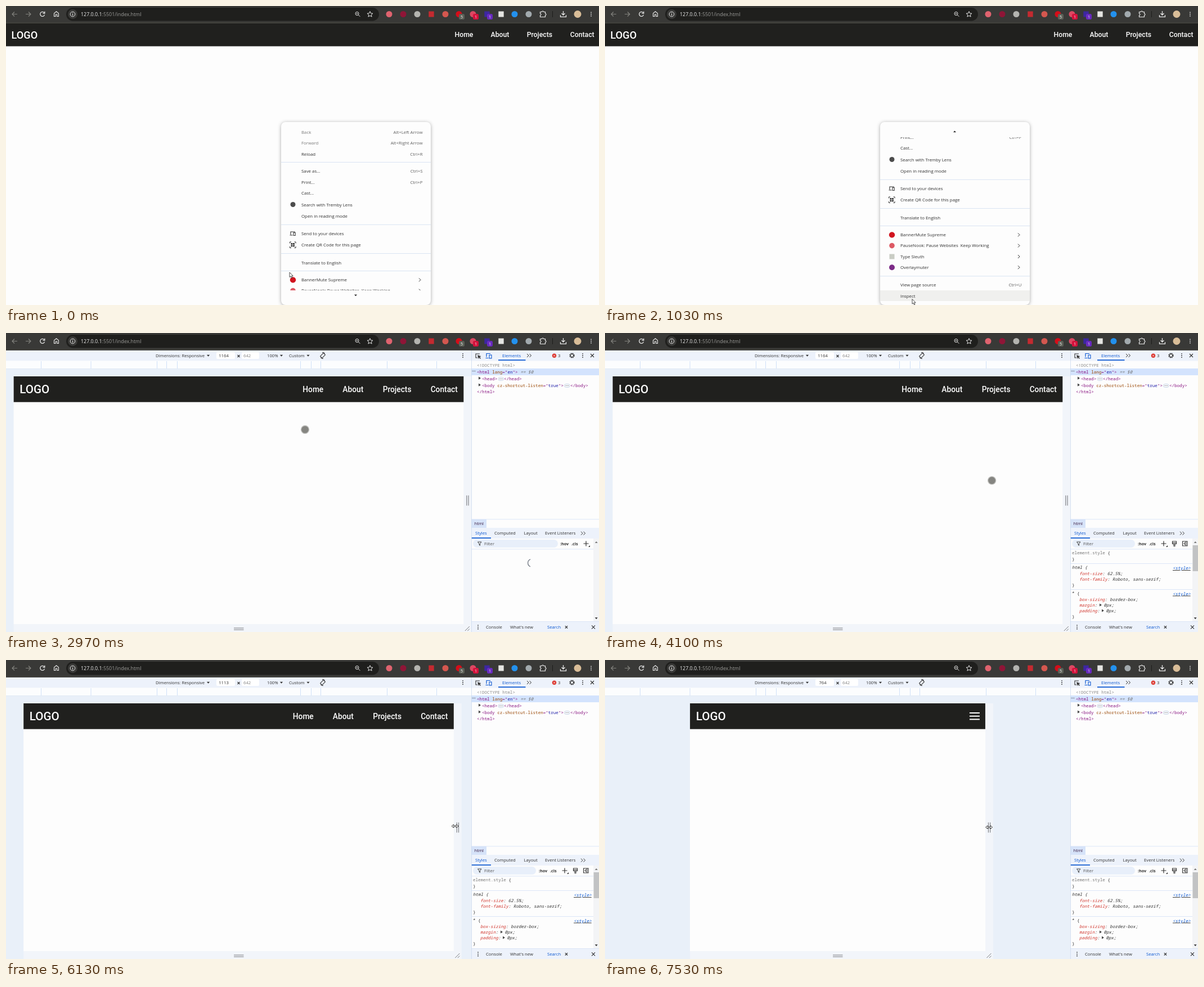
These frames come from a looping animation (1054 px wide and 531 px high, 8 s). An HTML page:

```html
<!DOCTYPE html>
<html lang="en">
<head>
<meta charset="utf-8">
<title>Responsive navigation bar in device mode</title>
<style>
  html, body { margin: 0; width: 100%; height: 100%; overflow: hidden; background: #fdfdfd; }
  svg { display: block; width: 100%; height: 100%; }
  text { white-space: pre; font-family: "Open Sans", "Noto Sans", sans-serif; }
  .mono { font-family: "Noto Sans Mono", "Liberation Mono", monospace; }
  .page { font-family: Roboto, Arial, sans-serif; font-weight: 500; }
</style>
</head>
<body>
<svg id="stage" viewBox="0 0 1054 531"></svg>
<script>
const LOOP = 8000, SCALE = 0.687, CENTER = 413.5;
const INK = '#303030', BLUE = '#0b57d0', BAR = '#edf2fb', LINE = '#d5e2f7';
const TAG = '#881280', ATTR = '#994500', VALUE = '#1a1aa6', PROP = '#d0342c';

const esc = s => s.replace(/&/g, '&amp;').replace(/</g, '&lt;');
const rect = (x, y, w, h, fill, extra = '') =>
  `<rect x="${x}" y="${y}" width="${w}" height="${h}" fill="${fill}" ${extra}/>`;
const dot = (x, y, r, fill, extra = '') => `<circle cx="${x}" cy="${y}" r="${r}" fill="${fill}" ${extra}/>`;
const path = (d, stroke = INK, width = 1, fill = 'none') =>
  `<path d="${d}" stroke="${stroke}" stroke-width="${width}" fill="${fill}"/>`;
const group = (id, ...parts) => `<g id="${id}">${parts.join('')}</g>`;

// Text is placed by the vertical middle of its capitals.
const text = (x, y, s, fill = INK, size = 7.7, extra = '') =>
  `<text x="${x}" y="${y + size * 0.36}" font-size="${size}" fill="${fill}" ${extra}>${esc(s)}</text>`;
const END = 'text-anchor="end"', MID = 'text-anchor="middle"', BOLD = 'font-weight="700"';
const code = (x, y, parts, extra = '') =>
  `<text class="mono" x="${x}" y="${y + 2.6}" font-size="7.55" ${extra}>` +
  parts.map(([fill, s]) => `<tspan fill="${fill}">${esc(s)}</tspan>`).join('') + '</text>';

const dots = (x, y, fill = INK) => [-3.2, 0, 3.2].map(d => dot(x, y + d, 0.9, fill)).join('');
const cross = (x, y, r = 3) =>
  path(`M${x - r} ${y - r}l${2 * r} ${2 * r}m0 ${-2 * r}l${-2 * r} ${2 * r}`, INK, 1.1);
const caret = (x, y, w = 2.6) => `<path d="M${x - w} ${y - w / 2}h${2 * w}l${-w} ${w * 1.2}z" fill="${INK}"/>`;
const chevrons = (x, y) => path(`M${x - 4} ${y - 3}l3 3-3 3m4.5-6l3 3-3 3`);
const triangle = (x, y) => `<path d="M${x} ${y - 2.6}v5.2l4-2.6z" fill="#444"/>`;

function browserBar() {
  const white = '#e6e6e6', grey = '#82827e';
  const badge = (x, fill, s) => rect(x - 5, 14, 10, 10, fill, 'rx="2.5"') +
    text(x, 19.2, s, '#fff', 7, MID);
  const icons = [[681, '#e0636f'], [706, '#8f1537'], [731, '#b4b4b0'], [781, '#d4574f'],
    [805, '#d50d19'], [830, '#dc4862'], [904, '#2391ee'], [929, '#a2aaae'], [1016, '#d9bd98']];
  const squares = [[756, '#c42a30'], [855, '#3d27a0'], [880, '#e5e5e2']];
  return rect(0, 0, 1054, 31, '#393937') + rect(0, 29.5, 1054, 1, '#4a4a43') +
    rect(107, 3, 556, 23.5, '#1f1f1d', 'rx="11.75"') +
    path('M20 14.5h-9m4-4l-4 4 4 4', grey, 1.2) + path('M35 14.5h9m-4-4l4 4-4 4', grey, 1.2) +
    path('M67.8 11.8a4 4 0 1 0 .8 3.8M68.8 9.7v3.4h-3.4', white, 1.3) +
    path('M85.5 18.5v-5.5l4-3.2 4 3.2v5.5h-2.7v-3.5h-2.6v3.5z', white, 1.1) +
    dot(118.5, 14.5, 8.5, '#3a3a38') + dot(118.5, 14.5, 4.3, 'none', `stroke="${white}"`) +
    path('M118.5 14v3m0-5v1', white, 1.1) +
    text(133, 14.5, '127.0.0.1', '#ececec', 8.9) + text(170.6, 14.5, ':5501/index.html', '#9c9c99', 8.9) +
    dot(624, 13.5, 3, 'none', `stroke="${white}"`) + path('M626.3 15.8l3 3m-6.8-5.3h3', white) +
    path('M647 9.6l1.4 3.3 3.6.3-2.7 2.4.8 3.5-3.1-1.9-3.1 1.9.8-3.5-2.7-2.4 3.6-.3z', white) +
    icons.map(([x, fill]) => dot(x, 14.5, x === 1016 ? 6.5 : 5.5, fill)).join('') +
    squares.map(([x, fill]) => rect(x - 4.7, 9.5, 9.4, 10, fill)).join('') +
    badge(810, '#5c6057', '5') + badge(835, '#d4123c', '1') + badge(860, '#6a2bc0', '1') +
    path('M949.5 10.5h3a1.5 1.5 0 0 1 3 0h3v3a1.5 1.5 0 0 1 0 3v3h-9v-3a1.5 1.5 0 0 0 0-3z', white, 1.2) +
    rect(971, 9, 1, 11, '#1c1c1a') +
    path('M990.5 9v7m-3-3l3 3 3-3m-8 3v3.3h10v-3.3', white, 1.3) + dots(1040, 14.5, white);
}

function plainPage() {
  const nav = [[797.5, 'Home'], [861.5, 'About'], [925.7, 'Projects'], [1002.7, 'Contact']];
  return rect(0, 31, 1054, 500, '#fdfdfd') + rect(0, 31, 1054, 40.5, '#20201e') +
    text(9.5, 51.2, 'LOGO', '#fff', 18.2, 'class="page"') +
    nav.map(([x, s]) => text(x, 50.6, s, '#fff', 12.25, 'class="page"')).join('');
}

function contextMenu() {
  const rows = [
    [224, 'Back', 'Alt+Left Arrow', '#7a7a7a'], [243.5, 'Forward', 'Alt+Right Arrow', '#7a7a7a'],
    [262.7, 'Reload', 'Ctrl+R'], [293.3, 'Save as...', 'Ctrl+S'], [312.7, 'Print...', 'Ctrl+P'],
    [332, 'Cast...'], [352.7, 'Search with Tremby Lens'], [373.2, 'Open in reading mode'],
    [404, 'Send to your devices'], [424.3, 'Create QR Code for this page'],
    [455.7, 'Translate to English'], [486.4, 'BannerMute Supreme', '>'],
    [505.6, 'PauseNook: Pause Websites  Keep Working', '>'], [525, 'Type Sleuth', '>'],
    [544.2, 'Overlaymuter', '>'], [575.6, 'View page source', 'Ctrl+U'], [595, 'Inspect']];
  const label = ([y, s, key, fill = INK]) => text(525, y, s, fill, 7.85) +
    (key === '>' ? path(`M734 ${y - 3}l3 3-3 3`) : key ? text(740.5, y, key, '#606060', 7.85, END) : '');
  const cells = [0, 1, 2, 3].map(i =>
    rect(506.5 + (i % 2) * 3.6, 421 + (i >> 1) * 3.6, 2.8, 2.8, INK)).join('');
  return '<clipPath id="menuClip"><rect id="clipBox" x="489" width="266"/></clipPath>' +
    rect(489, 206, 266, 325, '#fdfdfd', 'rx="8" style="filter:drop-shadow(0 1px 3px #0005)"') +
    '<g clip-path="url(#menuClip)">' + group('rows',
      rect(489, 585, 266, 19, '#f0f0ee', 'id="hover"'),
      [277.5, 388.3, 439.5, 470.5, 559.8].map(y => rect(489, y - 0.5, 266, 1, '#d9e4f3')).join(''),
      rows.map(label).join(''),
      dot(510, 352.5, 4.5, '#4c4c4c'),
      path('M506 406v-5h8m-9.5 6h5', INK, 1.1), rect(511, 402.5, 3.2, 5, 'none', `stroke="${INK}"`),
      path('M504.5 421.5v-2.5h2.5m5.5 0h2.5v2.5m0 5.5v2.5h-2.5m-5.5 0h-2.5v-2.5'), cells,
      dot(510, 486.4, 5.2, '#d1141f'), dot(510, 505.6, 4.8, '#dd5964'),
      rect(505.5, 520.5, 9, 9, '#c9ccc4'), dot(510, 544.2, 5, '#7c2b87')) + '</g>' +
    group('upArrow', '<path d="M619 224.3h5l-2.5-2.7z" fill="#222"/>') +
    group('downArrow', '<path d="M619 512.5h5l-2.5 2.7z" fill="#222"/>');
}

function deviceToolbar() {
  const ticks = [62, 150.5, 268, 285, 304, 523, 542, 559, 677, 765];
  return rect(0, 31, 827, 18.5, BAR) + rect(0, 49.5, 827, 14, '#fcfdfe') +
    ticks.map(x => rect(x, 50, 1, 13, '#cfe0f8')).join('') + rect(0, 63, 827, 0.8, '#dde6f4') +
    text(266, 40, 'Dimensions: Responsive') + caret(359.5, 40) +
    rect(374, 34, 33, 12, '#fff', 'rx="2"') + rect(419, 34, 31, 12, '#fff', 'rx="2"') +
    text(387, 40, '1164', INK, 7.7, `id="widthLabel" ${MID}`) + cross(413.5, 41, 2) +
    text(422, 40, '642', '#808080') + text(464, 40, '100%') + caret(489.5, 40) +
    text(503, 40, 'Custom') + caret(537, 40) +
    '<g transform="rotate(45 563 40)">' + rect(560.7, 36, 4.6, 8, 'none', `stroke="${INK}"`) + '</g>' +
    path('M559 43.6a5.4 5.4 0 0 0 5 1.8M567 36.4a5.4 5.4 0 0 0-5-1.8') + dots(812, 40);
}

function devicePage() {
  const nav = [[-286, 'Home'], [-215, 'About'], [-143.7, 'Projects'], [-58.7, 'Contact']];
  return rect(0, 63.5, 827, 468, '#e9f0f9') +
    rect(0, 77, 0, 454, '#f2f5fa', 'id="frame"') + rect(0, 77, 0, 440, '#fdfdfd', 'id="sheet"') +
    rect(0, 77, 0, 45.7, '#20201e', 'id="header"') +
    group('left', text(10.6, 100, 'LOGO', '#fff', 20.6, 'class="page"')) +
    group('right',
      group('nav', nav.map(([x, s]) => text(x, 99.8, s, '#fff', 13.74, 'class="page"')).join('')),
      group('burger', [93, 98.7, 104.4].map(y => rect(-28, y, 18, 2, '#fff')).join('')),
      path('M5.5 288.5v18m3.2-18v18', '#77797d', 1.1),
      path('M2.5 529l8-8m-3.5 8l3.5-3.5', '#77797d')) +
    path('M405 524h17.5m-17.5 3h17.5', '#77797d', 1.1) +
    group('overlay', rect(13.5, 77, 799.5, 45.7, 'rgba(111,168,220,.66)'),
      '<g style="filter:drop-shadow(0 1px 2px #0006)">',
      rect(15, 128.5, 84, 21.5, '#fff', 'rx="2"'), '<path d="M21 129l6-5.5 6 5.5z" fill="#fff"/></g>',
      text(21.5, 139.5, 'html', TAG, 8, BOLD), text(48, 139.5, '1164 × 66.8', INK, 8));
}

function domTree() {
  const pill = (x, y) => rect(x, y - 2.8, 9.5, 5.8, '#f8fafd', 'rx="2.8" stroke="#b5c5dc" stroke-width=".7"');
  const ellipsis = (x, y) => [2.6, 4.8, 7].map(d => dot(x + d, y, 0.6, '#555')).join('');
  return group('tree',
    group('selected', rect(827, 63, 227, 12, '#d3e3fd'), text(828, 68, '•••', '#555', 6),
      code(910, 69, [['#707070', ' == $0']], 'font-style="italic"'),
      triangle(840, 80.2), triangle(840, 92.2)),
    code(837, 57.5, [['#8b8b8b', '<!DOCTYPE html>']]),
    code(837, 69, [[TAG, '<html'], [ATTR, ' lang'], [TAG, '="'], [VALUE, 'en'], [TAG, '">']]),
    code(846, 81, [[TAG, '<head>']]), pill(875, 81.5), code(885, 81, [[TAG, '</head>']]),
    code(846, 93, [[TAG, '<body'], [ATTR, ' cz-shortcut-listen'], [TAG, '="'], [VALUE, 'true'], [TAG, '">']]),
    pill(992.5, 93.5), code(1003, 93, [[TAG, '</body>']]), code(837, 104.7, [[TAG, '</html>']]),
    group('pillDots', ellipsis(875, 81.5), ellipsis(992.5, 93.5)));
}

function stylesPane() {
  const italic = 'font-style="italic"';
  const rule = (y, name, value) => code(843, y, [[PROP, name], [INK, ': ' + value + ';']], italic);
  const shorthand = (y, name, x) => code(843, y, [[PROP, name], [INK, ':']], italic) +
    triangle(x, y) + code(x + 7.5, y, [[INK, '0px;']], italic);
  const link = y => code(1009, y, [[BLUE, '<style>']], italic + ' text-decoration="underline"');
  const tools = (x, plus) => text(x, 374, ':hov', INK, 7.2, BOLD) + text(x + 20, 374, '.cls', INK, 7.2, BOLD) +
    path(`M${x + 41.5} 374h9m-4.5-4.5v9`, plus, 1.2) + `<path d="M${x + 53} 377v3h-3z" fill="${plus}"/>`;
  return group('narrowFilter', rect(830, 367, 151, 14, '#e8effa', 'rx="7"'),
      group('toolsPale', tools(985, '#999')), group('toolsDark', tools(985, INK))) +
    group('spinner', path('M-2.5 6.5A7 7 0 0 1-2.5-6.5', '#777d88', 1.4)) +
    group('rules', rect(830, 367, 112, 14, '#e8effa', 'rx="7"'), tools(947, INK),
      path('M1008.5 370h7v4.5h-7zm2.5 4.5v4h2v-4m-4.5-2h7', INK, 1.1),
      path('M1026.5 370h8.5v8h-8.5zm6 0v8m-1.5-6l-2 2 2 2', INK, 1.1),
      rect(1044.5, 377, 9.5, 46, '#c2c3c4'),
      [409, 455].map(y => rect(827, y, 217, 0.8, LINE)).join(''),
      code(830, 390, [['#777', 'element.style'], [INK, ' {']]), code(830, 401.5, [[INK, '}']]),
      code(830, 416, [[INK, 'html {']], italic), link(417.5),
      rule(427, 'font-size', '62.5%'), rule(437, 'font-family', 'Roboto, sans-serif'),
      code(830, 447, [[INK, '}']]), code(830, 462, [[INK, '* {']]), link(463),
      rule(473, 'box-sizing', 'border-box'), shorthand(483, 'margin', 879),
      shorthand(493, 'padding', 883), code(830, 503, [[INK, '}']])) +
    path('M838.5 371h6.5l-2.5 3.3v3l-1.5-1v-2z', INK, 0.9) + text(850, 374, 'Filter', '#555');
}

function devPanel() {
  return rect(827, 31, 227, 500, '#fdfdfd') + rect(827, 31, 227, 18.5, BAR) +
    path('M842 37h-7v7h3', INK, 1.1) + path('M838.5 39.5l5.5 2-2.5.9 2.2 2.3-.9.9-2.2-2.3-.9 2.2z', INK, 0.5, INK) +
    path('M861 36.5h-7v6m-1.5 2h5', BLUE, 1.2) + rect(859, 39, 4, 6, 'none', `stroke="${BLUE}" stroke-width="1.1"`) +
    text(882, 40, 'Elements', BLUE) + rect(875, 47.3, 48.5, 1.7, BLUE) +
    group('tabsWide', text(931, 40, 'Console'), chevrons(975, 40)) +
    group('tabsErrors', chevrons(930, 40), dot(974.5, 40.3, 3.7, '#dc362e'),
      path('M973 38.8l3 3m0-3l-3 3', '#fff', 0.8), text(981, 40.3, '3')) +
    dot(1006, 40, 3.8, 'none', `stroke="${INK}" stroke-width="1.6" stroke-dasharray="2 1"`) +
    dot(1006, 40, 2.6, 'none', `stroke="${INK}"`) + dots(1025, 40) + cross(1042, 40) + domTree() +
    group('emptyCrumb', rect(827, 335, 227, 0.8, LINE)) +
    group('crumb', rect(827, 330.5, 227, 0.8, LINE), rect(827, 331, 27, 15, '#d6e3f9'), text(832.5, 338.7, 'html', '#3a1c40')) +
    rect(827, 346, 227, 19, BAR) + text(834, 355.7, 'Styles', BLUE) + rect(827, 363.3, 35, 1.7, BLUE) +
    text(868, 355.7, 'Computed') + text(920.5, 355.7, 'Layout') + text(958, 355.7, 'Event Listeners') +
    chevrons(1026, 355.7) + rect(827, 383.5, 217, 0.8, LINE) +
    rect(1044, 365, 10, 147, '#f3f4f6') + '<path d="M1046.7 373h5l-2.5-3z" fill="#777"/>' + caret(1049.2, 506.5, 2.5) +
    stylesPane() + rect(827, 512.5, 227, 19, BAR) + rect(827, 512, 227, 0.8, LINE) + dots(839, 522.3) +
    text(853, 522.3, 'Console') + text(896, 522.3, "What's new") + text(962, 522.3, 'Search', BLUE) +
    cross(996, 522.3, 2.2) + cross(1044, 522.3) + rect(827, 31, 0.8, 500, '#cbd9ee');
}

function cursors() {
  return group('arrow', path('M0 0v8.6l2-1.8 1.5 3.4 1.5-.7-1.5-3.2h2.7z', '#222', 0.8, '#fff')) +
    group('touch', dot(0, 0, 7.7, '#c3c3c0'), dot(0, 0, 6.3, '#858581')) +
    group('resize', path('M-6 0l3.3-2.8v1.8h5.4v-1.8L6 0 2.7 2.8V1h-5.4v1.8z', '#222', 0.9, '#fff'));
}

document.getElementById('stage').innerHTML =
  group('plain', plainPage(), group('menu', contextMenu())) +
  group('device', devicePage(), deviceToolbar(), devPanel()) + browserBar() + cursors();

const el = {};
document.querySelectorAll('[id]').forEach(node => el[node.id] = node);
const show = (id, on) => { el[id].style.display = on ? '' : 'none'; };
const set = (id, name, value) => el[id].setAttribute(name, value);
const move = (id, x, y = 0) => set(id, 'transform', `translate(${x} ${y})`);

// Linear track through [time, value...] keys, held at both ends.
function track(keys, t) {
  const i = keys.findIndex(key => key[0] > t);
  if (i === 0) return keys[0].slice(1);
  if (i < 0) return keys[keys.length - 1].slice(1);
  const a = keys[i - 1], b = keys[i], p = (t - a[0]) / (b[0] - a[0]);
  return a.slice(1).map((v, k) => v + (b[k + 1] - v) * p);
}

const WIDTHS = [[5870, 1164], [6000, 1140], [6200, 1099], [6430, 1099], [6530, 1000], [6700, 990],
  [6770, 916], [6950, 850], [7200, 795], [7500, 764]];
const POINTER = [[30, 504, 473], [250, 520, 513], [560, 520, 513], [700, 546, 520.5], [1430, 546, 520.5],
  [1650, 740, 330], [1870, 879, 206], [2230, 879, 206], [2600, 690, 185], [2970, 531.5, 171.5],
  [3070, 531.5, 171.5], [3400, 390, 100], [3870, 600, 240], [4450, 820, 295]];
const SCROLL = [[200, 0], [530, 80]];
const rightEdge = t => CENTER + track(WIDTHS, t)[0] * SCALE / 2;

function draw(t) {
  const opened = t >= 1560, selected = t >= 2030, inspected = t >= 2300, styled = t >= 4030;
  show('plain', !opened); show('device', opened);

  const scroll = track(SCROLL, t)[0];
  show('menu', t < 1400); show('hover', t >= 670);
  show('upArrow', scroll > 0); show('downArrow', scroll < 80);
  move('rows', 0, -scroll);
  const top = scroll > 0 ? 233 : 206, bottom = scroll < 80 ? 505 : 531;
  set('clipBox', 'y', top); set('clipBox', 'height', bottom - top);

  const width = Math.round(track(WIDTHS, t)[0]), span = width * SCALE;
  const left = CENTER - span / 2, right = CENTER + span / 2;
  for (const id of ['frame', 'sheet', 'header']) {
    set(id, 'x', left); set(id, 'width', id === 'frame' ? span + 14 : span);
  }
  move('left', left); move('right', right);
  el.widthLabel.textContent = width;
  show('nav', width > 768); show('burger', width <= 768);

  show('overlay', t >= 1700 && !inspected);
  show('tree', t >= 1700);
  for (const id of ['selected', 'pillDots', 'crumb']) show(id, selected);
  show('emptyCrumb', !selected);
  show('tabsWide', !inspected); show('tabsErrors', inspected);
  show('narrowFilter', !styled); show('rules', styled);
  show('toolsPale', !selected); show('toolsDark', selected);
  show('spinner', inspected && !styled);
  set('spinner', 'transform', `translate(934.5 408.3) rotate(${(t - 2970) * 0.36})`);

  let [x, y] = track(POINTER, t);
  const resizing = t >= 4450, touching = t >= 2300 && x < 813 && !resizing;
  if (resizing) {
    x = rightEdge(t + 63) + 6.7;
    y = track([[6770, 295], [7500, 297]], t)[0];
  }
  const active = resizing ? 'resize' : touching ? 'touch' : 'arrow';
  for (const id of ['arrow', 'touch', 'resize']) show(id, id === active);
  move(active, x, y);
}

const start = performance.now();
function tick() {
  draw((performance.now() - start) % LOOP);
  requestAnimationFrame(tick);
}
tick();
</script>
</body>
</html>
```
